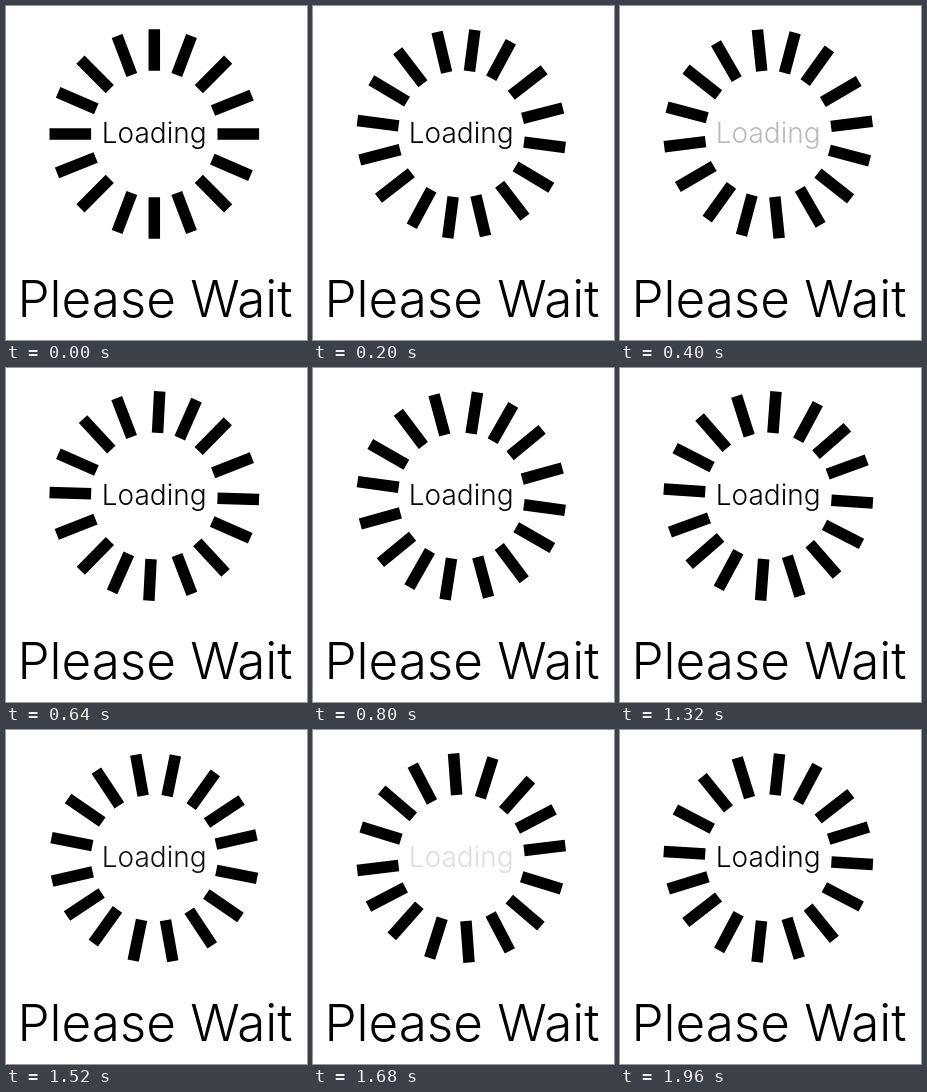
Recreate the animation shown at these times as an HTML page. Size 301x334 px, loop 2000 ms.

```html
<!DOCTYPE html>
<html lang="en">
<head>
<meta charset="utf-8">
<title>Loading</title>
<style>
  html, body { margin: 0; width: 100%; height: 100%; overflow: hidden; background: #fff; }
  svg { display: block; width: 301px; height: 334px; }
  text { font-family: Inter, "Liberation Sans", Arial, sans-serif; font-weight: 330; text-anchor: middle; }
</style>
</head>
<body>
<svg viewBox="0 0 301 334">
  <g transform="translate(148.3 128)">
    <path id="ring" stroke="#000" stroke-width="11.5"/>
  </g>
  <text id="label" x="148.2" y="136.7" font-size="28">Loading</text>
  <text x="149" y="311.2" font-size="51.2">Please Wait</text>
</svg>
<script>
  const LOOP = 2000, STEP = 40, DEG_PER_STEP = 1.485;
  const INNER = 63.2, OUTER = 104.8;
  const FADE_AT = [360, 1660], FADE_HALF = 150;
  // Slightly uneven spokes; the second half of the ring repeats the first.
  const halfTurn = [0, 20.8, 44.8, 68.2, 90, 113.4, 135.2, 159.2];

  const ring = document.getElementById('ring');
  const label = document.getElementById('label');

  const point = (angle, radius) => {
    const a = angle * Math.PI / 180;
    return `${radius * Math.sin(a)} ${-radius * Math.cos(a)}`;
  };
  ring.setAttribute('d', [...halfTurn, ...halfTurn.map(a => a + 180)]
    .map(a => `M${point(a, INNER)}L${point(a, OUTER)}`).join(''));

  const start = performance.now();
  function draw() {
    const step = Math.floor((performance.now() - start) % LOOP / STEP);
    const gap = Math.min(...FADE_AT.map(t => Math.abs(step * STEP - t)));
    ring.setAttribute('transform', `rotate(${step * DEG_PER_STEP})`);
    label.setAttribute('opacity', Math.min(1, gap / FADE_HALF));
    requestAnimationFrame(draw);
  }
  draw();
</script>
</body>
</html>
```
